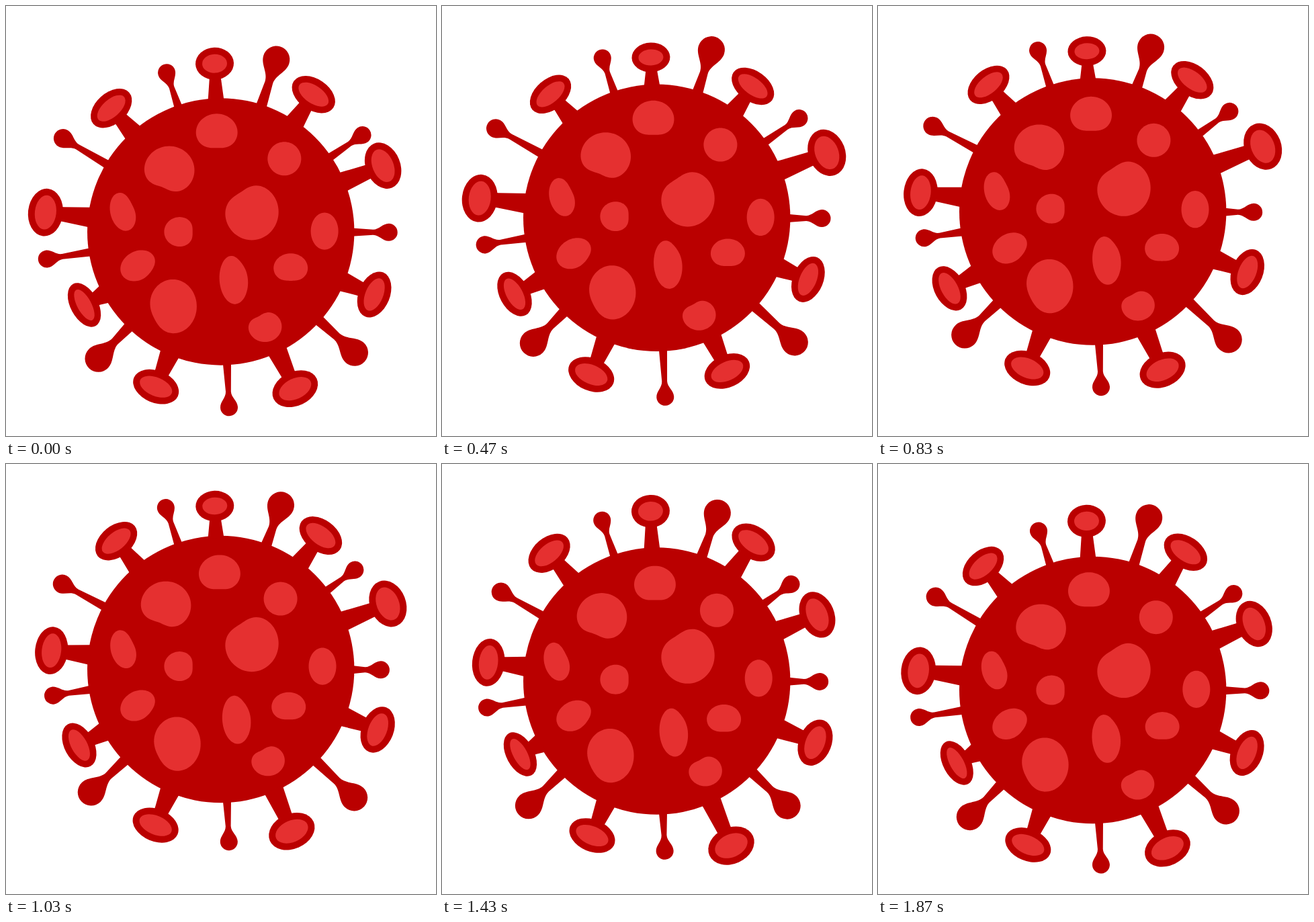
Recreate the animation shown at these times as an HTML page. Size 640x640 px, loop 1930 ms.

```html
<!DOCTYPE html>
<html lang="en">
<head>
<meta charset="utf-8">
<title>Virus</title>
<style>
  html, body { margin: 0; width: 100%; height: 100%; overflow: hidden; background: #fff; }
  svg { display: block; width: 100%; height: 100%; }
</style>
</head>
<body>
<svg id="stage" viewBox="0 0 640 640"></svg>
<script>
const LOOP = 1930;
const DARK = '#ba0000', LIGHT = '#e53030';
const RADIUS = 198.7;
const BOB = [[0, 336], [270, 323.3], [670, 309.3], [1030, 305.5], [1430, 323], [1670, 333]];
const stage = document.getElementById('stage');
const updates = [];

function add(tag, attrs, parent) {
  const node = document.createElementNS('http://www.w3.org/2000/svg', tag);
  for (const name in attrs) node.setAttribute(name, attrs[name]);
  parent.appendChild(node);
  return node;
}

const wave = (peak, t) => Math.cos(2 * Math.PI * (t - peak) / LOOP);

// Smooth periodic curve through a few [time, value] keys.
function curve(keys, t) {
  const n = keys.length;
  const time = i => keys[(i + n) % n][0] + LOOP * Math.floor(i / n);
  const value = i => keys[(i + n) % n][1];
  const rate = i => (value(i + 1) - value(i)) / (time(i + 1) - time(i));
  const slope = i => {
    const before = time(i) - time(i - 1), after = time(i + 1) - time(i);
    return (rate(i - 1) * after + rate(i) * before) / (before + after);
  };
  let i = n - 1;
  while (time(i) > t) i--;
  const h = time(i + 1) - time(i), s = (t - time(i)) / h, r = 1 - s;
  return value(i) * (1 + 2 * s) * r * r + value(i + 1) * s * s * (3 - 2 * s)
    + h * s * r * (slope(i) * r - slope(i + 1) * s);
}

const body = add('g', {}, stage);
add('circle', { r: RADIUS, fill: DARK }, body);

// A spike points up in local space, stretches by a few pixels and swings by a few degrees.
function spike(shape, angle, reach, stretch, stretchPeak, swing = 0, swingPeak = 0) {
  const group = add('g', {}, body);
  const pose = shape(group);
  updates.push(t => {
    group.setAttribute('transform', `rotate(${angle + swing * wave(swingPeak, t)})`);
    pose(reach + stretch * wave(stretchPeak, t));
  });
}

// Flat sucker: the further it reaches, the fuller it gets.
const sucker = (rx = 35.5) => group => {
  const neck = add('path', { fill: DARK }, group);
  const rim = add('ellipse', { rx, fill: DARK }, group);
  const inside = add('ellipse', { rx: rx - 10, fill: LIGHT }, group);
  const foot = rx * 0.42, top = foot * 0.73;
  return d => {
    const ry = 24 + (d - 251) * 0.17;
    neck.setAttribute('d', `M${-foot} -195L${-top} ${ry - d}V${-d}H${top}V${ry - d}L${foot} -195Z`);
    rim.setAttribute('cy', -d);
    rim.setAttribute('ry', ry);
    inside.setAttribute('cy', -d);
    inside.setAttribute('ry', ry - 10);
  };
};

// Round knob on a thin stalk that flares into the head.
const knob = (r = 13) => group => {
  const path = add('path', { fill: DARK }, group);
  const foot = 2.5 + r * 0.28, n = r * 0.3;
  return d => {
    const [low, mid, high] = [1.8, 1.1, 0.7].map(k => k * r - d);
    path.setAttribute('d', `M${-foot} -195L${-n} ${low}C${-n} ${mid} ${-r} ${high} ${-r} ${-d}`
      + `A${r} ${r} 0 0 1 ${r} ${-d}C${r} ${high} ${n} ${mid} ${n} ${low}L${foot} -195Z`);
  };
};

// Ellipse with one side pressed in, drifting to and fro along a line.
function spot([x, y], [rx, ry], [dx, dy, peak], dent = 0, side = 0, tilt = 0) {
  const points = Array.from({ length: 72 }, (_, i) => {
    const a = i * Math.PI / 36;
    const k = 1 - dent * Math.exp(5 * (Math.cos(a - side * Math.PI / 180) - 1));
    return [rx * k * Math.cos(a), ry * k * Math.sin(a)];
  });
  const node = add('path', { d: `M${points.join('L')}Z`, fill: LIGHT }, body);
  updates.push(t => {
    const w = wave(peak, t);
    node.setAttribute('transform', `translate(${x + dx * w} ${y + dy * w}) rotate(${tilt})`);
  });
}

spike(sucker(28.5), -2.1, 246, 8.5, 1617);
spike(sucker(), 35.5, 247, 4.5, 1417, 1.6, 830);
spike(sucker(), 68.3, 264.6, 7.6, 650, 0.9, 650);
spike(sucker(), 111.7, 248, 5, 1373, 0.7, 200);
spike(sucker(), 155.5, 260, 9, 1398, 0.85, 1010);
spike(sucker(), 202.7, 251, 2, 628);
spike(sucker(), 241.8, 235.4, 7, 720);
spike(sucker(), 276.3, 258.6, 7.4, 316);
spike(sucker(), 319.6, 245.6, 3, 1450, 1.2, 1030);

spike(knob(), 341.2, 252, 2, 1075);
spike(knob(20), 18.9, 264.5, 5.2, 1829, 1.35, 1180);
spike(knob(), 54.6, 252.5, 6.5, 349, 1.15, 100);
spike(knob(), 90.2, 244.2, 6, 73);
spike(knob(20), 132.9, 272.4, 5.7, 718, 1.15, 1200);
spike(knob(), 177.3, 260, 7, 412);
spike(knob(20), 225.2, 264, 2.5, 1238, 1.35, 1100);
spike(knob(), 261.1, 257.5, 4.8, 99);
spike(knob(14), 299.4, 270.7, 4, 311, 1.3, 1830);

spot([-4, -145], [31, 28], [2.3, 3, 1120], 0.18, 90);
spot([-79, -93], [37.5, 36], [3.6, 2.4, 270], 0.25, 112);
spot([92, -107], [25, 25], [3.7, -2.4, 240]);
spot([46, -33.5], [40, 42], [0, 6, 260], 0.19, 238);
spot([-144.7, -30], [19, 29], [4, -1, 540], 0.15, -20, -14);
spot([-61.3, -2.2], [23, 22], [0, 2.3, 0], 0.16, 0);
spot([153, -2.5], [20.5, 27.6], [2, 2.3, 240]);
spot([-123.3, 52.4], [27.5, 21.5], [0, 2, 850], 0.08, 60, -30);
spot([-68.2, 111.2], [35.5, 40.3], [3.5, 0, 820], 0.1, 150);
spot([21, 72.6], [21.3, 36.5], [4.5, 3.6, 1330], 0.1, -50, -4);
spot([102.8, 55], [25.5, 22], [3.1, -2, 360], 0.15, 90);
spot([67.5, 139], [25, 23], [-4.9, 5.8, 370], 0.24, 240);

function draw(t) {
  body.setAttribute('transform', `translate(319.7 ${curve(BOB, t)})`);
  updates.forEach(update => update(t));
}

const start = performance.now();
function frame() {
  draw((performance.now() - start) % LOOP);
  requestAnimationFrame(frame);
}
frame();
</script>
</body>
</html>
```
